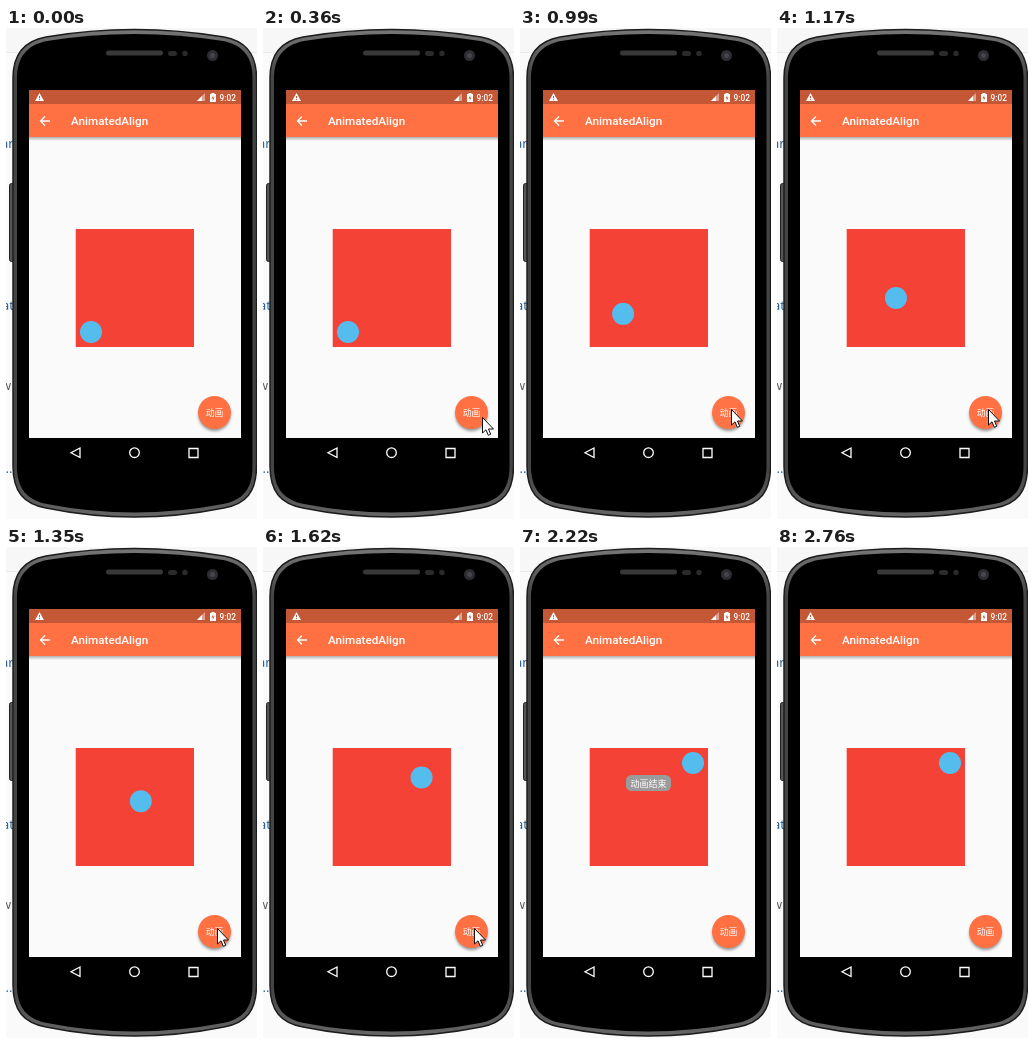
An HTML page that plays this animation: 251 px wide and 491 px high, repeating every 3.09 s.

```html
<!DOCTYPE html>
<html lang="zh">
<head>
<meta charset="utf-8">
<style>
  html, body { margin: 0; width: 100%; height: 100%; overflow: hidden; background: #fafafa; }
  svg { display: block; width: 251px; height: 491px; }
  text { font-family: Roboto, "Noto Sans CJK SC", "Noto Sans CJK", sans-serif; fill: #fff; }
  .page text { font-family: "Open Sans", sans-serif; font-size: 13px; fill: #555; }
  .page .link { fill: #1d5a94; }
</style>
</head>
<body>
<svg viewBox="0 0 251 491">
  <defs>
    <linearGradient id="rim" x2="0" y2="1">
      <stop stop-color="#777"/><stop offset=".1" stop-color="#444"/>
      <stop offset=".9" stop-color="#444"/><stop offset="1" stop-color="#666"/>
    </linearGradient>
    <linearGradient id="shade" x2="0" y2="1">
      <stop stop-opacity=".3"/><stop offset="1" stop-opacity="0"/>
    </linearGradient>
    <filter id="blur" x="-50%" y="-50%" width="200%" height="200%"><feGaussianBlur stdDeviation="1.8"/></filter>
  </defs>

  <g class="page">
    <path d="M0 0H251V24H0Z" fill="#f7f7f7"/>
    <path d="M0 24.5H251" stroke="#eaeaea"/>
    <text class="link" x="-5" y="120">ar</text>
    <text class="link" x="-4" y="282">at</text>
    <text x="-5" y="362">w</text>
    <text class="link" x="-4" y="445">...</text>
  </g>

  <g id="phone">
    <rect x="3.5" y="155.5" width="6" height="78" rx="2" fill="#555" stroke="#222"/>
    <path d="M7 50C7 26 18 13 40 9Q128 -6 218 9C240 13 250.500 26 250.500 50V438C250.500 464 240 476 218 480Q128 498 40 480C18 476 7 464 7 438Z" fill="url(#rim)" stroke="#1c1c1c" stroke-width="1.5"/>
    <path d="M11 50C11 29 21 17 41 13Q128 -1 217 13C237 17 246.500 29 246.500 50V438C246.500 461 237 472 217 476Q128 493 41 476C21 472 11 461 11 438Z"/>
    <rect x="100" y="22.500" width="57" height="5" rx="2.500" fill="#383838"/>
    <g fill="#2b2b2b"><rect x="162" y="23" width="9" height="5" rx="2.500"/><circle cx="179" cy="25.500" r="2.700"/></g>
    <circle cx="206.500" cy="27.500" r="5.500" fill="#2d2d32"/>
    <circle cx="206.500" cy="27.500" r="2.500" fill="#45454d"/>
  </g>

  <path d="M23 62H235V410H23Z" fill="#fafafa"/>
  <path d="M23 109H235V113H23Z" fill="url(#shade)"/>
  <path d="M23 76H235V109H23Z" fill="#ff7043"/>
  <path d="M23 62H235V76H23Z" fill="#c45735"/>

  <g fill="#fff">
    <path d="M33.500 65L38 73H29Z"/>
    <path d="M33.500 68V70.300M33.500 71.200V72.200" stroke="#c45735"/>
    <path d="M191 73L199 65V73Z" opacity=".45"/>
    <path d="M191 73L196 68V73Z"/>
    <path d="M204 66H205.500V65H208.500V66H210V74H204Z"/>
    <path d="M207.500 67L205.500 70.500H207L206.500 73L208.500 69.500H207Z" fill="#c45735"/>
    <text x="213.500" y="73" font-size="8.300" font-weight="500">9:02</text>
    <text x="65" y="97" font-size="11.700" font-weight="500">AnimatedAlign</text>
  </g>
  <path d="M44 93H35M39 88.500L34.500 93L39 97.500" fill="none" stroke="#fff" stroke-width="1.300"/>
  <g fill="none" stroke="#fff" stroke-width="1.300">
    <path d="M74 420V429.500L65 424.700Z"/>
    <circle cx="128.500" cy="424.700" r="4.800"/>
    <path d="M183 420.500H192V429.500H183Z"/>
  </g>

  <path d="M69.700 201H188V319H69.700Z" fill="#f44336"/>
  <circle id="badge" r="11" fill="#54bdee"/>

  <circle cx="208.500" cy="387" r="16" opacity=".42" filter="url(#blur)"/>
  <circle cx="208.500" cy="384.500" r="16.500" fill="#ff7043"/>
  <text x="208.500" y="388" font-size="8.800" font-weight="500" text-anchor="middle">动画</text>
  <circle id="press" cx="208.500" cy="384.500" r="16.500" fill="#ddd"/>

  <g id="toast">
    <rect x="106" y="228" width="45" height="16" rx="5.500" fill="#9b9b9b"/>
    <text x="128.500" y="239.500" font-size="9" text-anchor="middle">动画结束</text>
  </g>
  <path id="cursor" d="M.5 .5V16L4 12.800L6.300 18.300L8.700 17.300L6.500 12H11.500Z" fill="#fff" stroke="#111"/>
</svg>
<script>
  const LOOP = 3090, STEP = 30;
  const [badge, press, toast, cursor] =
    ['badge', 'press', 'toast', 'cursor'].map(id => document.getElementById(id));

  // time, x, y of the pointer tip
  const pointerPath = [
    [240, 243, 415], [360, 219, 389], [480, 219, 389], [510, 214, 384], [540, 211, 381],
    [1650, 211, 381], [1830, 239, 207], [1920, 238, 172], [1950, 242, 161], [1980, 253, 161]
  ];
  const clamp = v => Math.min(1, Math.max(0, v));
  const mix = (a, b, p) => a + (b - a) * p;
  const place = (el, x, y) => el.setAttribute('transform', `translate(${x} ${y})`);

  function pointerAt(t) {
    const i = pointerPath.findIndex(key => key[0] > t);
    if (i < 1) return [-50, -50];
    const [t0, x0, y0] = pointerPath[i - 1], [t1, x1, y1] = pointerPath[i];
    const p = (t - t0) / (t1 - t0);
    return [mix(x0, x1, p), mix(y0, y1, p)];
  }

  function draw(t) {
    const p = t < 840 ? 0 : clamp((t - 784) / 1000);
    place(badge, mix(85, 173, p), mix(304, 216, p));
    place(cursor, ...pointerAt(t));
    press.style.opacity = t < 780 ? 0 : 0.12 * clamp((1020 - t) / 180);
    toast.style.opacity = t < 2400 ? clamp((t - 1830) / 390) : clamp((2760 - t) / 210);
  }

  const start = performance.now();
  function tick() {
    const t = (performance.now() - start) % LOOP;
    draw(Math.floor(t / STEP) * STEP);
    requestAnimationFrame(tick);
  }
  tick();
</script>
</body>
</html>
```
